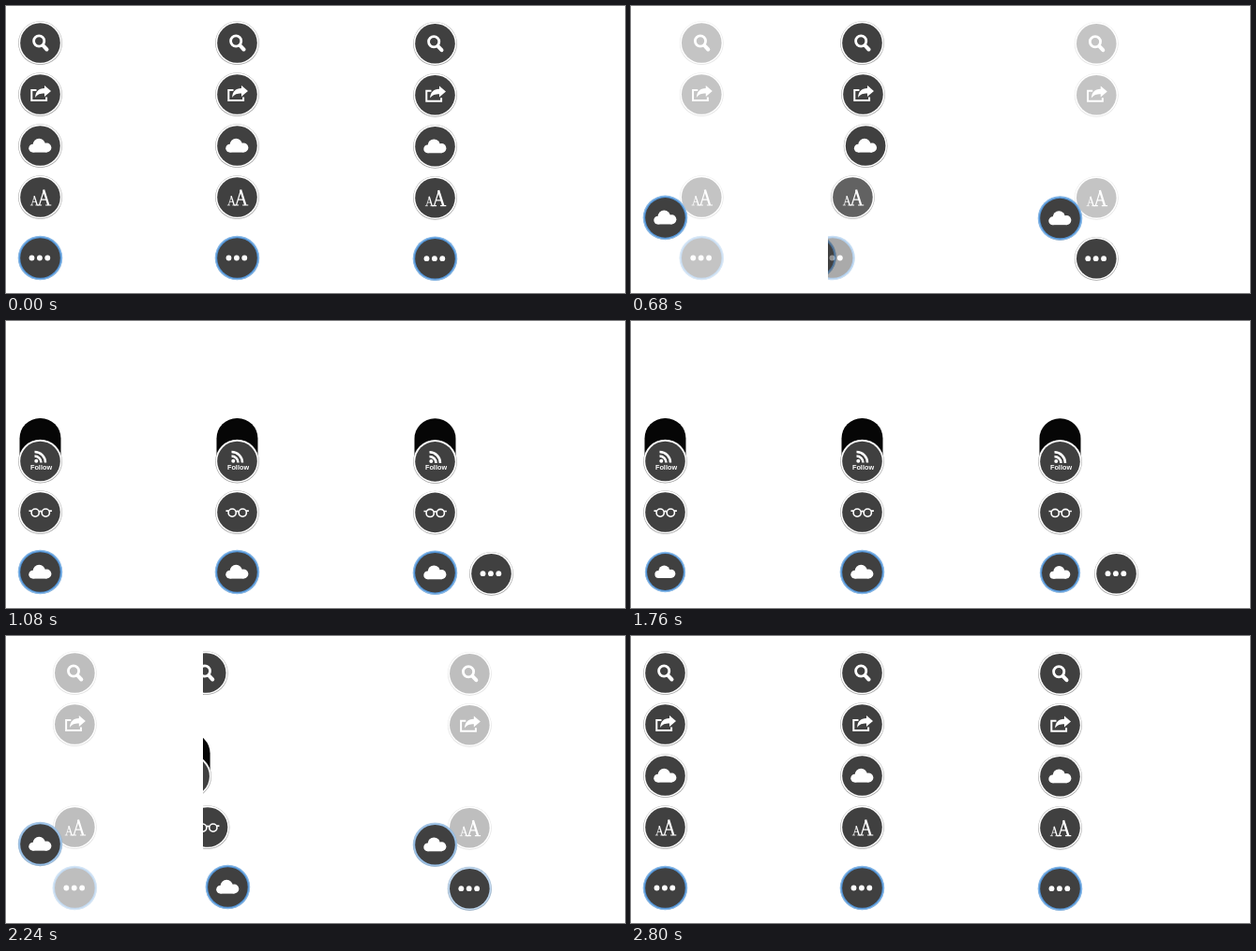
An HTML page that plays this animation: 660 px wide and 307 px high, repeating every 2840 ms.

```html
<!DOCTYPE html>
<html lang="en">
<head>
<meta charset="utf-8">
<title>Round menu transitions</title>
<style>
html, body { margin: 0; width: 100%; height: 100%; overflow: hidden; background: #fff; }
svg { display: block; width: 660px; height: 307px; }
text { font: bold 7.3px "Liberation Sans", Arial, sans-serif; text-anchor: middle; }
</style>
</head>
<body>
<svg id="stage" viewBox="0 0 660 307">
  <defs>
    <clipPath id="pane"><rect x="210" y="0" width="211" height="307"/></clipPath>
  </defs>
</svg>
<script>
const LOOP = 2840, STEP = 40, BACK_AT = 1760;
const SLIDE = 60, EXIT = 56;
const stage = document.getElementById('stage');

const letterA = '<path stroke-width="1.2" d="M-7 0h5M2 0h6.2M-4.6 0L.4-16M-3-5.8h6.4"/><path stroke-width="2.3" d="M0-16.5L5.2 0"/>';
const line = (body, extra = '') => `<g fill="none" stroke="#fff" ${extra}>${body}</g>`;

const icons = {
  search: line('<circle cx="-1.3" cy="-2" r="5.6" stroke-width="2.8"/><path d="M3.4 3.2L7 7" stroke-width="4" stroke-linecap="round"/>'),
  share: line('<path d="M-4-4.5H-9.2V6.6H6.6V3" stroke-width="2"/>') +
    '<path fill="#fff" d="M11.5-3.6L4.5-9.6V-6.4C-2-6.4-5-2.5-5.4 3.4C-3-.2 0-1 4.5-1V2.4Z"/>',
  cloud: '<g fill="#fff"><circle cx="-7.8" cy="2.7" r="4.4"/><circle cx="-1.2" cy="-1.2" r="6.6"/><circle cx="6.8" cy="2" r="5.1"/><path d="M-8 1H7V7.1H-8Z"/></g>',
  type: line(`<g transform="translate(3.6 8.5)">${letterA}</g><g transform="translate(-6.4 8.5) scale(.6)">${letterA}</g>`),
  more: '<g fill="#fff">' + [-9, -.6, 7.8].map(x => `<circle cx="${x}" cy="0" r="2.9"/>`).join('') + '</g>',
  follow: line('<path d="M-6-5.4A7 7 0 0 1 1 1.6M-6-10A11.5 11.5 0 0 1 5.5 1.6" stroke-width="2.5"/>') +
    '<circle cx="-4.2" cy="-.3" r="2" fill="#fff"/><text x="1" y="9" fill="#fff">Follow</text>',
  glasses: line('<circle cx="-5.3" cy=".6" r="4.1"/><circle cx="5.8" cy=".6" r="4.1"/><path d="M-1.4-.4Q.2-1.8 1.8-.4M-9-1.4H-12M9.6-1.4H12.4"/>', 'stroke-width="1.6"')
};

const pill = '<rect x="-22" y="-46" width="44" height="68" rx="21.5" fill="#060606"/>';

function group(parent, html = '') {
  const g = document.createElementNS('http://www.w3.org/2000/svg', 'g');
  g.innerHTML = html;
  parent.appendChild(g);
  return g;
}

function button(parent, name) {
  const g = group(parent, `${name === 'follow' ? pill : ''}
    <circle r="23.4" cy=".2" fill="#a4a4a4"/><circle r="22.9" cy="-.1" fill="#fff"/>
    <g class="glow"><circle r="23.8" fill="#8cbbe8"/><circle r="22.6" fill="#5395d8"/></g>
    <circle r="21.3" fill="#404040"/>${icons[name]}`);
  const glow = g.querySelector('.glow');
  return (x, y, { scale = 1, alpha = 1, blue = 0 } = {}) => {
    g.setAttribute('transform', `translate(${x} ${y}) scale(${Math.max(scale, 0)})`);
    g.setAttribute('opacity', scale > 0 ? alpha : 0);
    glow.setAttribute('opacity', blue);
  };
}

const clamp = v => Math.min(1, Math.max(0, v));
const span = (t, start, length) => clamp((t - start) / length);
const backIn = t => t * t * (2.70158 * t - 1.70158);
const backOut = t => 1 - backIn(1 - t);

// Bezier (.25, .1, .25, 1)
function ease(x) {
  if (x <= 0 || x >= 1) return clamp(x);
  const curve = (u, a, b) => 3 * a * u * (1 - u) ** 2 + 3 * b * u * u * (1 - u) + u ** 3;
  let lo = 0, hi = 1;
  for (let i = 0; i < 24; i++) {
    const mid = (lo + hi) / 2;
    if (curve(mid, .25, .25) < x) lo = mid; else hi = mid;
  }
  return curve(lo, .1, 1);
}

function press(t) {
  const start = t < BACK_AT ? 40 : BACK_AT;
  const hold = t < BACK_AT ? 320 : 1860;
  if (t < start) return 1;
  return .91 - .05 * span(t, start, 120) + (.09 + .05 * span(t, start, 120)) * span(t, hold, 120);
}

// Pop-in scale on the way forward, pop-out on the way back
const pop = (t, show, hide) =>
  t < BACK_AT ? backOut(span(t, show, 280)) : 1 - backIn(span(t, hide, 300));

// Cross-fading menu; keepMore leaves the last button beside the chosen one
function fadeMenu(x, dy, keepMore) {
  const layer = group(stage);
  const b = {};
  for (const name of ['search', 'share', 'type', 'more', 'follow', 'glasses', 'cloud'])
    b[name] = button(layer, name);
  const rows = { search: 39.5, share: 94.5, type: 204.5 };

  return t => {
    const forward = t < BACK_AT;
    const p = forward ? ease(span(t, 436, 650)) : 1 - ease(span(t, 2144, 400));
    const swap = forward ? clamp(p * 1.6) : p;
    const alpha = clamp(1 - 1.08 * p);
    for (const name in rows) b[name](x + SLIDE * p, rows[name] + dy, { alpha });
    b.more(x + SLIDE * p, 269.5 + dy, keepMore ? { blue: 1 - swap } : { alpha, blue: 1 });
    b.cloud(x, 149.5 + 119 * p + dy, { scale: press(t), blue: swap });
    b.follow(x, 150 + dy / 2, { scale: pop(t, 800, 1860) });
    b.glasses(x, 204.5 + dy / 2, { scale: pop(t, 760, 1830) });
  };
}

// Staggered menu that leaves and enters through the left edge
function slideMenu(x) {
  const clip = group(stage);
  clip.setAttribute('clip-path', 'url(#pane)');
  const inner = [
    ['cloud', 268.5, 675, 1978], ['glasses', 204.5, 720, 1928], ['follow', 150, 770, 1897]
  ].map(([name, y, enter, leave]) => ({ set: button(clip, name), y, enter, leave, blue: +(name === 'cloud') }));
  const outer = [
    ['search', 39.5, 690, 2213], ['share', 94.5, 641, 2240], ['cloud', 149.5, 592, 2247],
    ['type', 204.5, 418, 2255], ['more', 269.5, 368, 2265]
  ].map(([name, y, leave, enter]) => ({ set: button(clip, name), y, enter, leave, blue: +(name === 'more') }));

  function arrive(item, t) {
    const k = span(t, item.enter, 272);
    item.set(x - EXIT * (1 - backOut(k)), item.y, { blue: item.blue, alpha: k > 0 ? 1 : 0 });
  }
  function depart(item, t, fade) {
    const k = span(t, item.leave, 350), e = backIn(k);
    const alpha = k === 1 ? 0 : fade ? clamp(1 - e) : 1;
    item.set(x - EXIT * e, item.y, { blue: item.blue, alpha });
  }

  return t => {
    const forward = t < BACK_AT;
    for (const item of inner) forward ? arrive(item, t) : depart(item, t, false);
    for (const item of outer) forward ? depart(item, t, true) : arrive(item, t);
  };
}

const menus = [fadeMenu(36.5, 0, false), slideMenu(246.5), fadeMenu(457.5, .7, true)];
const start = performance.now();

function draw() {
  const time = (performance.now() - start) % LOOP;
  const t = Math.floor(time / STEP) * STEP;
  for (const menu of menus) menu(t);
  requestAnimationFrame(draw);
}
draw();
</script>
</body>
</html>
```
